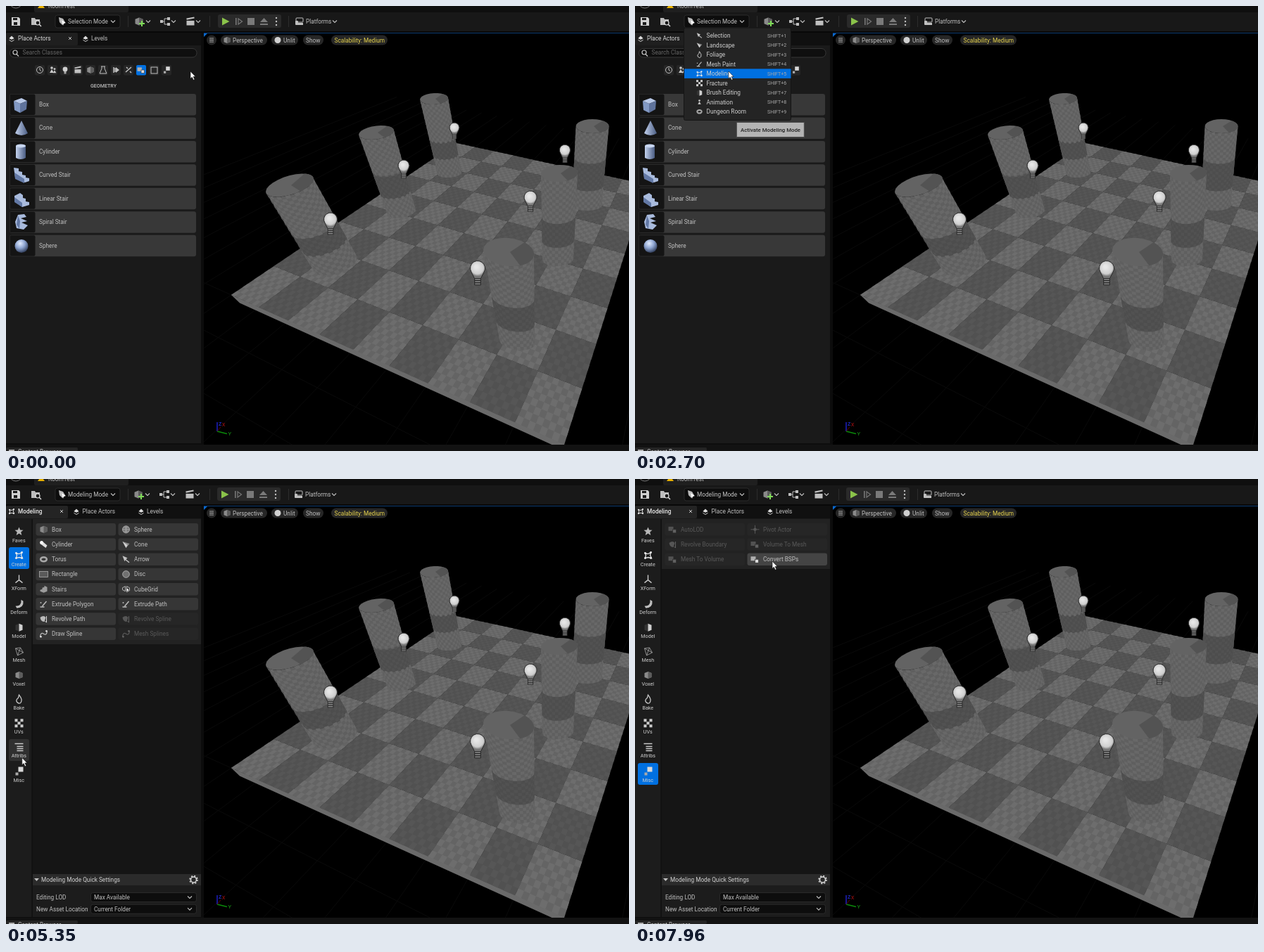
Animation of 885x633 px, one loop 8 s. Source, as an HTML page with a canvas:

```html
<!DOCTYPE html>
<html lang="en">
<head>
<meta charset="utf-8">
<title>Editor modes</title>
<style>
html,body{margin:0;width:100%;height:100%;overflow:hidden;background:#0b0b0b}
canvas,svg{position:absolute;left:0;top:0;width:885px;height:633px;display:block}
text{font-family:Roboto,"Open Sans",sans-serif;white-space:pre}
</style>
</head>
<body>
<canvas id="view" width="885" height="633"></canvas>
<svg id="ui" viewBox="0 0 885 633">
<defs>
<linearGradient id="steel"><stop offset="0" stop-color="#c3d2ee"/><stop offset="1" stop-color="#4a5c82"/></linearGradient>
<radialGradient id="ball" cx=".4" cy=".3" r=".7"><stop offset="0" stop-color="#e2ecff"/><stop offset=".5" stop-color="#8fa6d2"/><stop offset="1" stop-color="#33415f"/></radialGradient>
</defs>
</svg>
<script>
const LOOP = 8000, GREY = '#c0c0c0', BLUE = '#0070e0';
const ui = document.getElementById('ui');

// ---------- svg helpers ----------
const rect = (x, y, w, h, fill, r = 0, more = '') =>
  `<rect x="${x}" y="${y}" width="${w}" height="${h}" rx="${r}" fill="${fill}" ${more}/>`;
const text = (x, y, s, fill = GREY, size = 8.25, more = '') =>
  `<text x="${x}" y="${y}" fill="${fill}" font-size="${size}" ${more}>${s}</text>`;
const mid = 'text-anchor="middle"';
const path = (d, fill = GREY, stroke = 'none', w = 1) =>
  `<path d="${d}" fill="${fill}" stroke="${stroke}" stroke-width="${w}"/>`;
const line = (d, c = GREY, w = 1) => path(d, 'none', c, w);
const dot = (x, y, r, fill, more = '') => `<circle cx="${x}" cy="${y}" r="${r}" fill="${fill}" ${more}/>`;
const at = (x, y, s, more = '') => `<g transform="translate(${x} ${y})" ${more}>${s}</g>`;
const chevron = (x, y) => line(`M${x - 3} ${y - 1.5}l3 3 3-3`, GREY, 1.1);
const cross = (x, y) => line(`M${x - 2} ${y - 2}l4 4m0-4l-4 4`, GREY, 1);
function group(s) {
  const g = document.createElementNS('http://www.w3.org/2000/svg', 'g');
  g.innerHTML = s;
  ui.append(g);
  return g;
}

// ---------- small icons, centred on 0,0 ----------
const ico = {
  cube: path('M-5-3L0-5 5-3V3L0 5-5 3z', '#8a8a8a') + path('M0-5L5-3V3L0 5z', '#5c5c5c'),
  ball: dot(0, 0, 5, '#777', 'stroke="#bbb" stroke-width=".8"') + line('M-5 0H5M0-5V5M-3.5-3.5Q0-1 3.5-3.5M-3.5 3.5Q0 1 3.5 3.5', '#bbb', .6),
  tube: path('M-5-1L-2-4.5 5 1.5 3 5z', '#e0e0e0') + dot(-3, -2.5, 2.4, '#fff'),
  cone: path('M-5-4L5-1 0 5z', '#8c8c8c') + path('M-5-4L2 1 0 5z', '#d0d0d0'),
  ring: `<ellipse rx="4.3" ry="3" fill="none" stroke="#a8a8a8" stroke-width="2.6"/>`,
  arrow: path('M-5-5L2-2 0 0 5 4 4 5-1 1-2 3z', '#c4c4c4'),
  card: rect(-6, -4, 12, 8, '#5a5a5a', 0, 'stroke="#aaa" stroke-width=".8"'),
  disc: dot(0, 0, 4.8, '#707070', 'stroke="#b0b0b0"'),
  steps: path('M-5 3V1L-2 0V-2L1-3V-5L5-3V3L0 5z', '#9c9c9c'),
  grid: line('M-5-2L-1-4V3L-5 1zM1-4l4 2V2L1 4z', '#b5b5b5') + dot(2, 1, 1.6, '#ddd'),
  pen: line('M-5 4H1M-2 3L4-4', '#bbb', 1.5) + dot(-4, -2, 1, '#bbb'),
  spin: path('M-5-2Q0-6 3-2L1 4Q-4 4-5-2z', '#bbb') + line('M4-4V5L2 3', '#ddd'),
  curve: line('M-5 4Q-4-3 0 0T5-4', '#bbb', 1.2) + dot(-4, 4, 1.3, '#ddd') + dot(4, -4, 1.3, '#ddd'),
  move: line('M0-6V6M-6 0H6', '#bbb') + dot(0, 0, 2.2, '#bbb'),
  blocks: rect(-6, -4, 7, 6, '#b0b0b0') + rect(0, 0, 5, 5, '#ddd', 0, 'stroke="#333" stroke-width=".7"'),
  star: path('M0-6L1.7-2 6-1.6 2.7 1.2 3.8 5.6 0 3.2-3.8 5.6-2.7 1.2-6-1.6-1.7-2z', '#b8b8b8'),
  shape: line('M-4-3L0-2 4-4 3 0 5 4 0 3-4 4-3 0z', '#e4e4e4', 1.3) + dot(-4, -3, 1.4, '#eee') + dot(4, -4, 1.4, '#eee') + dot(4, 4, 1.4, '#eee') + dot(-4, 4, 1.4, '#eee'),
  axes: line('M0-6V1L-5 5M0 1L5 5', '#c8c8c8', 1.4),
  bend: path('M-5 4Q4 4 3-5L6-3Q7 6-3 7z', '#c0c0c0'),
  half: path('M0-5L-5-3V4L0 6z', '#333') + path('M0-5L5-3V4L0 6z', '#d0d0d0'),
  mesh: line('M-5-4L2-5 6 2-2 6zM-5-4L6 2M2-5L-2 6', '#aaa', .8),
  flame: line('M0-6Q5 0 3 4T-3 4Q-5 1-1-2z', '#c8c8c8', 1.3),
  check: [0, 1, 2, 3, 4, 5, 6, 7, 8].filter(i => i % 2 < 1).map(i => rect(i % 3 * 4 - 6, (i / 3 | 0) * 4 - 6, 4, 4, '#ccc')).join(''),
  rows: line('M-6-5H6M-3-1H6M-3 2H6M-3 5H6', '#c8c8c8', 1.5),
  misc: rect(-1, -6, 7, 7, '#d8d8d8') + rect(-5, 2, 4, 4, '#aaa'),
  clap: rect(-5, -1, 10, 6, '#c0c0c0') + line('M-5-3L5-5', GREY, 2),
  bulb: dot(0, -1, 3.4, '#d0d0d0') + rect(-1.5, 2, 3, 3.5, '#aaa'),
  man: dot(0, -3, 1.8, '#ccc') + path('M-3 4L0-1 3 4z', '#ccc'),
  layers: path('M-4 0L0-4 4 0 0 2z', '#ddd') + line('M-4 2.5L0 5 4 2.5', '#ddd')
};
const icon = (n, x, y, k = 1) => `<g transform="translate(${x} ${y}) scale(${k})">${ico[n]}</g>`;

// ---------- fixed chrome ----------
group(
  rect(0, 0, 885, 10, '#0f0f0f') + rect(40, -4, 134, 13, '#1f1f1f', 2) + dot(14, -6, 9, '#0f0f0f', 'stroke="#777" stroke-width="1"') +
  path('M45 3L50-4 55 3z', '#e8b100') + text(60, 2.6, 'RoomTest') +
  rect(0, 9, 885, 27, '#181818') + rect(0, 36, 885, 2, '#080808') +
  rect(0, 38, 277, 586, '#1a1a1a') + rect(0, 38, 277, 18, '#101010') + rect(277, 38, 4, 586, '#0c0c0c') +
  rect(0, 624, 885, 9, '#121212') + rect(0, 622, 277, 2, '#0d0d0d') + rect(0, 628, 102, 5, '#242424', 2) +
  rect(4, 631, 8, 3, '#aaa') + text(17, 637, 'Content Browser') +
  path('M8 16h10l2 2v10H8z', '#d0d0d0') + rect(10, 17, 6, 3, '#181818') + rect(11, 23, 5, 4, '#181818') +
  path('M36 17h5l1 2h6v8H36z', '#bdbdbd') + dot(45, 24, 3, '#181818', 'stroke="#ddd" stroke-width="1.2"') + line('M47 26l3 3', '#ddd', 1.4) +
  line('M173.5 14V30M289.5 14V30M401.5 14V30', '#2c2c2c')
);
const tools = group(
  icon('cube', 189, 22, 1.1) + line('M193 21v8m-4-4h8', '#7ed957', 2) + chevron(202, 22) +
  line('M221 22h4v-4h5m-5 4v4h5', GREY) + rect(219, 20, 4, 4, GREY) + rect(229, 16, 4, 4, GREY) + rect(229, 24, 4, 4, GREY) + chevron(238, 22) +
  icon('clap', 262, 22, 1.1) + chevron(273, 22) +
  rect(301, 12, 90, 19, '#2a2a2a', 3) + path('M307 16.5L317.5 22 307 27.500z', '#8bc34a') +
  rect(326, 17, 1.6, 10, '#777') + line('M330 18l5.500 4-5.500 4z', '#777', 1.2) + rect(343, 17, 10, 10, '#7a7a7a') +
  path('M361 23L366.500 17 372 23z', '#7a7a7a') + rect(361, 25, 11, 2, '#7a7a7a') +
  dot(384, 17, 1.2, GREY) + dot(384, 22, 1.2, GREY) + dot(384, 27, 1.2, GREY) +
  rect(412, 17, 10, 6, 'none', 1, 'stroke="#c0c0c0"') + rect(414, 24, 8, 3, GREY) + rect(411, 21, 4, 6, GREY, 1) +
  text(426, 24.700, 'Platforms') + chevron(467, 22)
);
const combo = rect(70, 13, 92, 18, '#0d0d0d', 3, 'id="combo" stroke="#303030" stroke-width=".8"');
group(combo + path('M75 16l6 2 3 5-4 4-4-4z', '#bbb') + path('M79 20l6 4-3 1-1 3z', '#fff') +
  text(88, 24.700, '', GREY, 8.25, 'id="mode"') + chevron(152, 22));

// viewport overlay
const pill = (x, w, s, tx, c) => rect(x, 41.5, w, 14, '#262626', 7) + text(tx, 51.600, s, c);
group(
  rect(281, 38, 604, 1, '#0b3a70') + path('M281 39h5l-5 5z', '#0a6ad0') +
  dot(292, 48.500, 7, '#262626') + line('M289 46h6m-6 2.500h6m-6 2.500h6', GREY, .9) +
  pill(305, 66, 'Perspective', 322) + icon('cube', 314, 48.500, .9) +
  pill(377, 38, 'Unlit', 394) + dot(386, 48.500, 4.500, '#d0d0d0') +
  pill(422, 29, 'Show', 426) + pill(462, 80, 'Scalability: Medium', 466.500, '#e8d44d') +
  line('M300 605V592', '#2222e0', 1.3) + line('M300 605l14 3.500', '#0a8a0a', 1.3) + line('M300 605l5-6', '#700', .8) +
  text(302, 597, 'Z', '#2a3cff', 7) + text(307, 598, 'X', '#b01010', 7) + text(315.500, 611, 'Y', '#18a018', 7.500)
);

// ---------- Place Actors panel ----------
const figures = [
  path('M11 135L22 131 30 135 20 139z', '#b9c9e8') + path('M11 135L20 139V152L12 148z', '#8299c4') + path('M20 139L30 135 29 147 20 152z', '#5f739c'),
  path('M22 163L13 181Q22 187 31 181z', 'url(#steel)'),
  path('M14 199V216Q21 220 28 216V199z', 'url(#steel)') + `<ellipse cx="21" cy="199" rx="7" ry="2.500" fill="#c8d6f0"/>`,
  path('M11 230l7 1v4l5 1v4l5 1v3l5 1v4l-6 2-14-7z', '#a9bbdd') + path('M12 237l14 9v6l-13-6z', '#6278a5'),
  path('M12 270l8-4 4 3v4l4 1v4l5 1v4l-10 3-11-8z', '#a9bbdd') + path('M12 272l11 8v6l-11-7z', '#6278a5'),
  path('M17 297l9-1 3 4-8 2 9 4-8 2 9 4-6 6-10-2-2-9z', '#a9bbdd') + path('M17 298l3 8-1 11-4-6z', '#6278a5'),
  dot(22, 341.500, 9.500, 'url(#ball)')
];
const names = ['Box', 'Cone', 'Cylinder', 'Curved Stair', 'Linear Stair', 'Spiral Stair', 'Sphere'];
const place = group(
  rect(0, 38, 102, 18, '#1f1f1f', 2) + icon('layers', 8, 46, .9) + text(17, 49, 'Place Actors', '#d8d8d8') + cross(91, 46) +
  icon('layers', 113, 46, .9) + text(121, 49, 'Levels') +
  rect(5.5, 60.5, 265.500, 12.500, '#0f0f0f', 6, 'id="search" stroke="#363636"') +
  dot(13, 66, 3, 'none', 'stroke="#c8c8c8" stroke-width="1.200"') + line('M15 68.500l3 3', '#c8c8c8', 1.3) + text(23.500, 69.300, 'Search Classes', '#666') +
  Array.from({length: 11}, (_, i) => rect(41 + 18 * i, 84, 14, 14.500, i == 8 ? BLUE : '#262626', 2)).join('') +
  dot(48, 91, 4.500, 'none', 'stroke="#c0c0c0"') + line('M48 88v3l2 1.500') + icon('man', 65, 91) + icon('man', 69, 92, .8) + icon('bulb', 84, 91) + icon('clap', 102, 91, .9) +
  icon('cube', 120, 91, .95) + line('M136 86v3l-3 7h10l-3-7v-3M135 86h6') + line('M153 87v8M155 88v6', GREY, 1.5) + path('M156 87l5 4-5 4z') +
  line('M170 94l8-7M171 87l2 2m3 4l2 2', GREY, 1.5) + icon('blocks', 192, 91, .9) + rect(206, 87, 9, 9, 'none', 0, 'stroke="#c0c0c0"') + icon('misc', 228, 91, .8) +
  text(138.500, 115.500, 'GEOMETRY', GREY, 7.1, mid + ' font-weight="500"') +
  names.map((n, i) => {
    const y = 125 + 33.45 * i;
    return rect(5, y, 265, 30.500, '#383838', 3) + rect(5.500, y + .5, 36, 29.500, '#141414', 2) + text(47, y + 18, n);
  }).join('') + figures.join('')
);

// ---------- Modeling panel ----------
const hot = []; // hoverable boxes
const side = 'Faves star,Create shape,XForm axes,Deform bend,Model half,Mesh mesh,Voxel cube,Bake flame,UVs check,Attribs rows,Misc misc'.split(',').map(s => s.split(' '));
const model = group(
  rect(0, 38, 88, 18, '#242424', 2) + icon('shape', 8, 46, .75) + text(17, 49, 'Modeling', '#e8e8e8', 8.25, 'font-weight="500"') + cross(79, 46) +
  icon('layers', 100, 46, .9) + text(108.500, 49, 'Place Actors') + icon('layers', 192, 46, .9) + text(200, 49, 'Levels') +
  rect(0, 57, 37, 566, '#1c1c1c') + rect(37, 57, 240, 566, '#151515') + rect(36.500, 57, 1, 566, '#0d0d0d') +
  side.map(([n, i], k) => {
    const y = 62.900 + 34.110 * k;
    return rect(4, y, 29, 31, 'none', 3, 'class="side"') + icon(i, 18.500, y + 11.500) + text(18.300, y + 26.600, n, '#d0d0d0', 7.2, mid);
  }).join('') +
  rect(38, 562, 239, 16, '#2b2b2b') + path('M40 568h7l-3.500 4z') + text(50, 573, 'Modeling Mode Quick Settings', '#d0d0d0') +
  dot(266.500, 570, 4, 'none', 'stroke="#ddd" stroke-width="1.500"') + dot(266.500, 570, 5.500, 'none', 'stroke="#ddd" stroke-width="1.500" stroke-dasharray="2.160 2.160"') +
  rect(38, 578, 239, 45, '#1c1c1c') +
  [['Editing LOD', 'Max Available'], ['New Asset Location', 'Current Folder']].map(([a, b], k) => {
    const y = 589 + 16.700 * k;
    return text(43, y + 9, a) + rect(120.500, y - .5, 150, 13, '#0d0d0d', 3, 'stroke="#303030" stroke-width=".8"') + text(125, y + 9, b) + chevron(261, y + 6);
  }).join('')
);
const sideBoxes = [...model.querySelectorAll('.side')];

// '!' marks a disabled tool
function palette(list, h) {
  const g = group(rect(38, 57, 239, h, '#222') + list.split(',').map((s, k) => {
    const off = s[0] == '!', [n, i] = s.replace('!', '').split('|');
    const x = k % 2 ? 159.500 : 42.500, y = 63 + 21.220 * (k >> 1);
    return rect(x, y, 113.500, 17.500, off ? '#262626' : '#363636', 3, off ? '' : 'class="tool"') +
      `<g opacity="${off ? .32 : 1}">${icon(i, x + 11, y + 8.800)}${text(x + 22.500, y + 11.800, n)}</g>`;
  }).join(''));
  for (const el of g.querySelectorAll('.tool')) hot.push(el);
  return g;
}
const create = palette('Box|cube,Sphere|ball,Cylinder|tube,Cone|cone,Torus|ring,Arrow|arrow,Rectangle|card,Disc|disc,Stairs|steps,CubeGrid|grid,Extrude Polygon|pen,Extrude Path|pen,Revolve Path|spin,!Revolve Spline|spin,Draw Spline|curve,!Mesh Splines|curve', 178);
const misc = palette('!AutoLOD|blocks,!Pivot Actor|move,!Revolve Boundary|spin,!Volume To Mesh|blocks,!Mesh To Volume|blocks,Convert BSPs|blocks', 71);

// ---------- mode menu ----------
const modes = 'Selection|arrow,Landscape|cone,Foliage|flame,Mesh Paint|pen,Modeling|shape,Fracture|check,Brush Editing|half,Animation|man,Dungeon Room|ring'.split(',').map(s => s.split('|'));
const rowY = i => 35.300 + 13.520 * i;
const menu = group(
  rect(69.500, 31, 152, 131.500, '#242424', 2, 'stroke="#151515"') + rect(70, 0, 151.500, 13.500, BLUE, 0, 'id="pick"') +
  modes.map(([n, i], k) => icon(i, 91.500, rowY(k) + 6.800, .75) + text(101.500, rowY(k) + 9.700, n, '#cfcfcf') +
    text(188, rowY(k) + 9.200, 'SHIFT+' + (k + 1), '#a8a8a8', 7)).join('')
);
const pick = menu.querySelector('#pick');

// ---------- tooltips and pointer ----------
const tips = [
  ['Activate Modeling Mode', 141, 165.500, 96, 2600, 4100],
  ['Create new cylinder objects', 141.500, 237, 106, 4250, 4700],
  ['Additional Utility Tools', 40.500, 429, 90.500, 5500, 7110]
].map(([s, x, y, w, from, to]) => ({
  from, to,
  el: group(rect(x, y, w, 21, '#f2f2f2', 0, 'stroke="#555"') + text(x + 5.700, y + 13.300, s, '#1a1a1a', 7.8, 'font-weight="500"'))
}));
const pointer = group(path('M0 0V10.300L2.300 8.200 4.200 12.300 5.900 11.500 4.100 7.500H7.200z', '#fff', '#111', .6));

// ---------- viewport scene ----------
function drawScene() {
  const c = document.getElementById('view').getContext('2d');
  const poly = (pts, fill) => {
    c.fillStyle = fill;
    c.beginPath();
    pts.forEach(p => c.lineTo(p[0], p[1]));
    c.fill();
  };
  c.fillStyle = '#000';
  c.beginPath();
  c.rect(281, 39, 604, 585);
  c.fill();
  c.clip();

  // unit square to floor: left, front, right, back corners
  const [x0, y0, x1, y1, x2, y2, x3, y3] = [320, 411, 793, 624, 910, 254, 640, 195];
  const ax = x1 - x2, bx = x3 - x2, sx = x0 - x1 + x2 - x3, ay = y1 - y2, by = y3 - y2, sy = y0 - y1 + y2 - y3;
  const det = ax * by - bx * ay, g = (sx * by - bx * sy) / det, h = (ax * sy - sx * ay) / det;
  const map = (u, v) => {
    const w = 1 + g * u + h * v;
    return [((x1 - x0 + g * x1) * u + (x3 - x0 + h * x3) * v + x0) / w, ((y1 - y0 + g * y1) * u + (y3 - y0 + h * y3) * v + y0) / w];
  };
  const cell = (u, v, s) => [map(u, v), map(u + s, v), map(u + s, v + s), map(u, v + s)];

  c.strokeStyle = '#0a0a0a';
  c.lineWidth = 1;
  const stroke = (a, b) => { c.beginPath(); c.moveTo(...a); c.lineTo(...b); c.stroke(); };
  for (let k = -7; k <= 11; k++) {
    stroke(map(k / 9, -.6), map(k / 9, 1.4));
    if (k < 1) stroke(map(-.8, k / 11), map(1.2, k / 11));
  }

  poly([[320, 411], [332, 422.500], [793, 632], [793, 620]], '#6a6a6a');
  const N = 9, M = 8;
  for (let i = 0; i < N; i++) for (let j = 0; j < N; j++) {
    const lit = (i + j) % 2 == 0;
    poly(cell(i / N, j / N, 1 / N), lit ? '#646464' : '#515151');
    for (let a = 0; a < M; a++) for (let b = a % 2; b < M; b += 2)
      poly(cell((i + a / M) / N, (j + b / M) / N, 1 / N / M), lit ? '#6d6d6d' : '#565656');
  }

  // top and foot: centre x, y, radii; dark band from d0 to d1; skew tilts the rim
  function pillar(top, foot, d0, d1, skew = 0) {
    const pt = (th, s) => {
      const [x, y, rx, ry] = top.map((n, k) => n + (foot[k] - n) * s);
      return [x + rx * Math.cos(th), y + ry * Math.sin(th) + skew * Math.cos(th)];
    };
    const arc = (a, b, s) => Array.from({length: 25}, (_, k) => pt(a + (b - a) * k / 24, s));
    const band = (a, b, fill) => poly([...arc(0, Math.PI, a), ...arc(Math.PI, 0, b)], fill);
    band(0, 1, '#5f5f5f');
    band(d0, d1, '#4d4d4d');
    const cols = 16, rows = 28, w = Math.PI / cols;
    for (let r = 0; r < rows; r++) for (let k = r % 2; k < cols; k += 2) {
      const s = r / rows, e = (r + 1) / rows, m = (s + e) / 2;
      poly([pt(k * w, s), pt(k * w + w, s), pt(k * w + w, e), pt(k * w, e)], m > d0 && m < d1 ? '#525252' : '#686868');
    }
    poly(arc(0, 2 * Math.PI, 0), '#636363');
    poly([[top[0] + 2, top[1]], ...arc(-.9, 1.1, 0)], '#535353');
  }
  function bulb(x, y, r) {
    const f = c.createRadialGradient(x - r * .2, y - r * .2, r * .2, x, y, r * 1.1);
    f.addColorStop(0, '#e6e6e6');
    f.addColorStop(.7, '#cfcfcf');
    f.addColorStop(1, '#777');
    c.fillStyle = f;
    c.strokeStyle = '#2a2a2a';
    c.beginPath();
    c.arc(x, y, r, Math.PI * .82, Math.PI * .18);
    c.lineTo(x + r * .42, y + r * 1.4);
    c.lineTo(x - r * .42, y + r * 1.4);
    c.closePath();
    c.fill();
    c.stroke();
    for (let k = 0; k < 3; k++) {
      c.fillStyle = '#262626';
      c.fillRect(x - r * .46, y + r * (1.4 + k * .3), r * .92, r * .3);
      c.fillStyle = '#8c8c8c';
      c.fillRect(x - r * .36, y + r * (1.45 + k * .3), r * .72, r * .15);
    }
  }
  pillar([608, 132, 20, 8], [630, 238, 17, 6], .52, .76, -1);
  pillar([526, 180, 25, 9.500], [562, 293, 20, 8], .48, .76, -3);
  pillar([403, 255, 34, 14], [468, 366, 31, 15], .53, .76, -9);
  pillar([833, 171, 23.500, 10], [825, 284, 21, 7], .4, .75);
  pillar([786, 238, 26, 12], [784, 360, 22, 10], .5, .78, -1);
  bulb(461, 303.500, 9.500);
  bulb(565, 227, 8);
  bulb(637, 173, 7);
  bulb(794, 205, 7.800);
  bulb(745, 272, 9);
  bulb(670, 373, 10.500);
  pillar([714, 350, 36, 20], [726, 478, 25, 11], .5, .78, 3);
}
drawScene();

// ---------- motion ----------
// time, x, y of the pointer tip
const track = [
  [275, 262, 93], [350, 261, 97], [475, 261, 97], [1100, 131, 18], [2000, 131, 18], [2525, 133, 93],
  [4150, 133, 93], [4250, 132, 94], [4625, 132, 94], [5500, 13.500, 422], [7085, 13.500, 422], [7960, 195, 117]
];
function tipAt(t) {
  let i = track.findIndex(k => k[0] > t);
  if (i < 0) i = track.length;
  const a = track[Math.max(i - 1, 0)], b = track[Math.min(i, track.length - 1)];
  const u = b[0] > a[0] ? (t - a[0]) / (b[0] - a[0]) : 0, e = u * u * (3 - 2 * u);
  return [a[1] + (b[1] - a[1]) * e, a[2] + (b[2] - a[2]) * e];
}
const step = t => t < 6700 ? Math.floor(t / 50) * 50 : Math.floor((t - 10) / 50) * 50 + 10;
const ramp = (t, a, d) => Math.min(1, Math.max(0, (t - a) / d));
const show = (el, on) => { el.style.display = on ? '' : 'none'; };
const over = (el, [x, y]) => {
  const dx = x - el.getAttribute('x'), dy = y - el.getAttribute('y');
  return dx >= 0 && dy >= 0 && dx < el.getAttribute('width') && dy < el.getAttribute('height');
};
const byId = id => document.getElementById(id);

function render(time) {
  const t = step(time), p = tipAt(t), hover = tipAt(t - 50);
  const modeling = t >= 4150, onMisc = time >= 6760, open = t >= 1500 && t < 4100;
  pointer.setAttribute('transform', `translate(${p[0].toFixed(1)} ${p[1].toFixed(1)})`);

  show(place, !modeling);
  show(model, modeling);
  show(create, modeling && !onMisc);
  show(misc, modeling && onMisc);
  tools.setAttribute('transform', `translate(${modeling ? -1 : 0} 0)`);
  byId('mode').textContent = modeling ? 'Modeling Mode' : 'Selection Mode';
  byId('combo').setAttribute('stroke', over(byId('combo'), hover) ? '#5a5a5a' : '#303030');
  byId('search').setAttribute('stroke', over(byId('search'), hover) ? '#575757' : '#363636');

  show(menu, open);
  menu.style.opacity = ramp(t, 1400, 200);
  const row = Math.floor((hover[1] - rowY(0)) / 13.520);
  show(pick, row >= 0 && row < modes.length);
  pick.setAttribute('y', rowY(row));

  sideBoxes.forEach((el, k) => {
    const on = over(el, hover), chosen = k == (onMisc ? 10 : 1);
    el.setAttribute('fill', chosen ? (on ? '#0e86fd' : BLUE) : on ? '#303030' : 'transparent');
  });
  for (const el of hot) el.setAttribute('fill', over(el, hover) ? '#444' : '#363636');

  for (const tip of tips) {
    const a = ramp(t, tip.from, tip.from == 2600 ? 150 : 100);
    show(tip.el, a > 0 && t < tip.to);
    tip.el.style.opacity = a;
    tip.el.setAttribute('transform', `translate(${tip.from == 2600 ? 10 * (1 - a) : 0} 0)`);
  }
}
function frame() {
  render(performance.now() % LOOP);
  requestAnimationFrame(frame);
}
frame();
</script>
</body>
</html>
```
